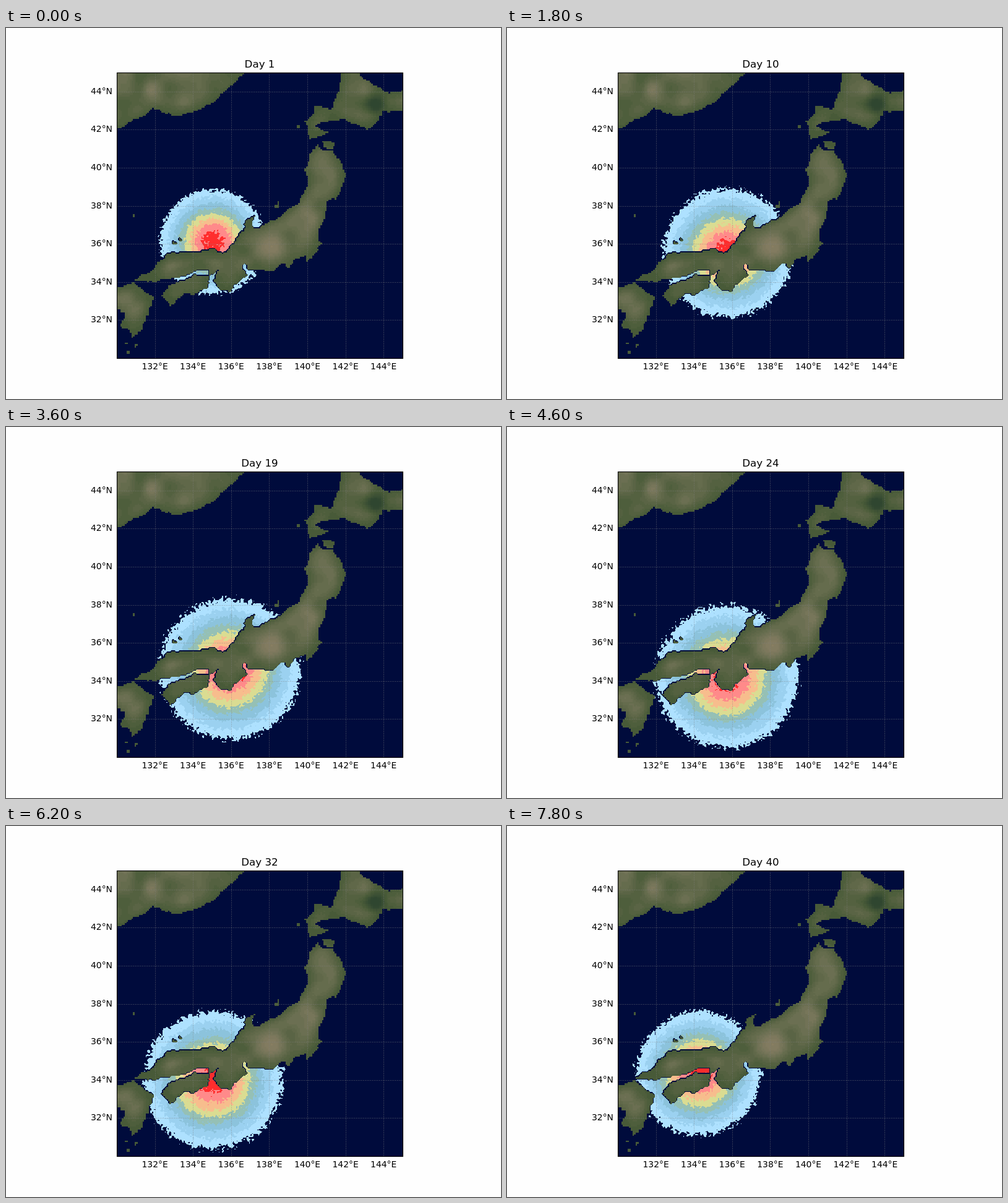
These frames come from a looping animation (800 px wide and 600 px high, 8 s). An HTML page with a canvas:

```html
<!DOCTYPE html>
<html lang="en">
<head>
<meta charset="utf-8">
<title>Daily map</title>
<style>
  html, body { margin: 0; width: 100%; height: 100%; overflow: hidden; background: #fefefe; }
  canvas { position: absolute; left: 179px; top: 72px; }
  svg { position: absolute; left: 0; top: 0; }
  text { font: 13.89px "DejaVu Sans", sans-serif; text-anchor: middle; }
  .lat { text-anchor: end; }
  #title { font-size: 16.67px; }
  .grid { stroke: #808080; stroke-opacity: .5; stroke-width: .7; stroke-dasharray: 2.57 1.11; }
</style>
</head>
<body>
<canvas id="map" width="462" height="462"></canvas>
<svg id="axes" width="800" height="600" viewBox="0 0 800 600">
  <text id="title" x="410" y="64">Day 1</text>
</svg>
<script>
const X0 = 179, Y0 = 72, SIZE = 462, CELLS = 180;
const STEP = SIZE / CELLS, DEG = SIZE / 15;
const DAY_MS = 200, DAYS = 40;

// Key points of the coasts in stage pixels; raggedness is added by noise
const coast = new Path2D(`
  M170 60 390 60 384 72 366 91 336 119 312 133 276 142 250 135 236 127 229 137 207 148 170 167z
  M541 60 571 60 573 76 590 90 618 104 650 102 650 134 610 134 588 164 541 146 497 156 521 170
    491 180 481 150 498 138 499 125 524 131 540 95z
  M503 187 508 197 527 198 541 214 548 240 534 276 515 280 518 296 503 333 508 350 498 368 484 380 484 367
    467 373 455 391 448 377 432 391 402 391 390 389 389 380 383 381 383 391 392 397 374 410 363 424
    348 425 334 407 345 390 332 396 328 403 330 389 312 389 303 396 280 402 232 411 206 406 230 395
    262 364 336 358 352 364 387 324 385 312 404 303 396 316 398 325 428 313 470 285 487 254 484 229 490 206z
  M330 402 322 420 304 431 290 428 266 449 252 432 262 416 275 411 291 406 303 400z
  M170 424 206 412 238 436 224 472 218 488 203 500 200 487 185 482 192 462 170 446z
  M511 183 530 185 530 196 515 192z M438 278 441 290 433 291z
  M271 345h4v3h-4z M278 340h4v4h-4z M205 301h3v4h-3z M470 157h4v5h-4z
  M193 508h4v4h-4z M207 512h4v4h-4z M194 521h5v4h-5z`);

// Main heights: x, y, radius, height
const peaks = [
  [430, 353, 26, .95], [508, 217, 20, .6], [488, 310, 24, .5],
  [578, 98, 14, .7], [230, 100, 13, .5], [596, 124, 16, -1]
];

const rgb = hex => [1, 3, 5].map(i => parseInt(hex.slice(i, i + 2), 16));
const SEA = rgb("#000b3c"), DARK = rgb("#2f4630"), GREEN = rgb("#485a38"),
      TAN = rgb("#77765a"), PEAK = rgb("#a58a70");
const bands = ["#ff2d2d", "#ff8a8a", "#f7bd8d", "#dadc92", "#95c0b5", "#8cc3dc", "#9bd1f0", "#aee1ff"].map(rgb);
const LOW = .2, TOP = .95, NOISE = .1;

const ctx = document.getElementById("map").getContext("2d");
const svg = document.getElementById("axes");
const title = document.getElementById("title");

const mix = (a, b, k) => a.map((v, i) => v + (b[i] - v) * k);
const cellX = n => X0 + (n % CELLS + .5) * STEP;
const cellY = n => Y0 + (Math.floor(n / CELLS) + .5) * STEP;

function random(n, seed) {
  let h = Math.imul(n + 1, 374761393) ^ Math.imul(seed, 668265263);
  h = Math.imul(h ^ (h >>> 13), 1274126177);
  h = Math.imul(h ^ (h >>> 16), 2246822519);
  return ((h ^ (h >>> 15)) >>> 0) / 4294967296;
}

function smoothNoise(x, y, scale, seed) {
  const i = Math.floor(x / scale), j = Math.floor(y / scale);
  const ease = t => t * t * (3 - 2 * t);
  const fx = ease(x / scale - i), fy = ease(y / scale - j);
  const at = (a, b) => random((j + b) * 1000 + i + a, seed);
  return (at(0, 0) * (1 - fx) + at(1, 0) * fx) * (1 - fy) + (at(0, 1) * (1 - fx) + at(1, 1) * fx) * fy;
}

const land = new Uint8Array(CELLS * CELLS);
const field = new Float32Array(CELLS * CELLS);
const base = ctx.createImageData(SIZE, SIZE);

function isLand(n) {
  const x = cellX(n), y = cellY(n);
  const shift = seed => (smoothNoise(x, y, 6, seed) - .5) * 4;
  return ctx.isPointInPath(coast, x + shift(1), y + shift(2));
}

// Share of land around a cell, 0 at the coast and 1 far inland
function inland(n) {
  const clamp = v => Math.max(0, Math.min(CELLS - 1, v));
  let sum = 0;
  for (let j = -6; j <= 6; j += 2)
    for (let i = -6; i <= 6; i += 2)
      sum += land[clamp(Math.floor(n / CELLS) + j) * CELLS + clamp(n % CELLS + i)];
  return Math.max(0, sum / 49 * 2 - 1);
}

function landColor(n) {
  const x = cellX(n), y = cellY(n);
  let h = inland(n) * (smoothNoise(x, y, 24, 3) * .8 + .05);
  for (const [px, py, r, top] of peaks)
    h += top * Math.exp(-(((x - px) ** 2 + (y - py) ** 2) / r ** 2));
  h = Math.round(h * 8) / 8;
  if (h < 0) return mix(GREEN, DARK, Math.min(1, -h * 1.5));
  return h < 1 ? mix(GREEN, TAN, h) : mix(TAN, PEAK, Math.min(1, h - 1));
}

function setPixel(img, x, y, c) {
  img.data.set([c[0], c[1], c[2], 255], (y * SIZE + x) * 4);
}

function buildBase() {
  land.forEach((_, n) => land[n] = isLand(n) ? 1 : 0);
  const colors = Array.from(land, (isle, n) => isle ? landColor(n) : SEA);
  for (let y = 0; y < SIZE; y++)
    for (let x = 0; x < SIZE; x++)
      setPixel(base, x, y, colors[Math.floor(y / STEP) * CELLS + Math.floor(x / STEP)]);
}

const plume = day => ({
  x: 326.5 + 36 * Math.cos(.087 * (day - 16.5)),
  y: 377.5 + 33.5 * Math.cos(.095 * (day - 31)),
  r: 114.5 - .057 * (day - 24) ** 2
});

// Interpolated field; a square with one land corner keeps its sea triangle
function sample(gx, gy) {
  const i = Math.floor(gx), j = Math.floor(gy);
  if (i < 0 || j < 0 || i > CELLS - 2 || j > CELLS - 2) return 0;
  const n = j * CELLS + i, fx = gx - i, fy = gy - j;
  let [a, b, c, d] = [field[n], field[n + 1], field[n + CELLS], field[n + CELLS + 1]];
  const la = land[n], lb = land[n + 1], lc = land[n + CELLS], ld = land[n + CELLS + 1];
  const count = la + lb + lc + ld;
  if (count > 1) return 0;
  if (count) {
    const gap = (la || lc ? fx : 1 - fx) + (la || lb ? fy : 1 - fy);
    if (gap < 1) return 0;
    if (la) a = b + c - d;
    else if (lb) b = a + d - c;
    else if (lc) c = a + d - b;
    else d = b + c - a;
  }
  return (a + (b - a) * fx) * (1 - fy) + (c + (d - c) * fx) * fy;
}

// A noisy bell curve, cut into bands of a tenth each
function drawDay(day) {
  const p = plume(day), k = Math.log(TOP / LOW) / p.r ** 2;
  for (let n = 0; n < field.length; n++) {
    const d2 = (cellX(n) - p.x) ** 2 + (cellY(n) - p.y) ** 2;
    field[n] = TOP * Math.exp(-k * d2) + (random(n, day) - .5) * NOISE;
  }
  const img = new ImageData(new Uint8ClampedArray(base.data), SIZE, SIZE);
  for (let y = 0; y < SIZE; y++)
    for (let x = 0; x < SIZE; x++) {
      const v = sample((x + .5) / STEP - .5, (y + .5) / STEP - .5);
      if (v >= LOW) setPixel(img, x, y, bands[Math.max(0, 9 - Math.floor(v * 10))]);
    }
  ctx.putImageData(img, 0, 0);
  title.textContent = "Day " + day;
}

function add(tag, attrs, text = "") {
  const el = document.createElementNS("http://www.w3.org/2000/svg", tag);
  for (const k in attrs) el.setAttribute(k, attrs[k]);
  el.textContent = text;
  svg.append(el);
}

function buildAxes() {
  for (let k = 2; k < 15; k += 2) {
    const x = X0 + k * DEG, y = Y0 + SIZE - k * DEG;
    const gx = Math.round(x) + .5, gy = Math.round(y) + .5;
    add("line", { class: "grid", x1: gx, x2: gx, y1: Y0 + SIZE, y2: Y0 });
    add("line", { class: "grid", x1: X0, x2: X0 + SIZE, y1: gy, y2: gy });
    add("text", { x, y: 552 }, 130 + k + "°E");
    add("text", { class: "lat", x: 172, y: Math.round(y + 4) }, 30 + k + "°N");
  }
  add("rect", { x: X0 + .5, y: Y0 + .5, width: SIZE, height: SIZE, fill: "none", stroke: "#000", "stroke-width": 1.1 });
}

let shown = 0;
function frame() {
  const day = Math.floor(performance.now() / DAY_MS) % DAYS + 1;
  if (day !== shown) drawDay(shown = day);
  requestAnimationFrame(frame);
}

buildBase();
buildAxes();
frame();
</script>
</body>
</html>
```
